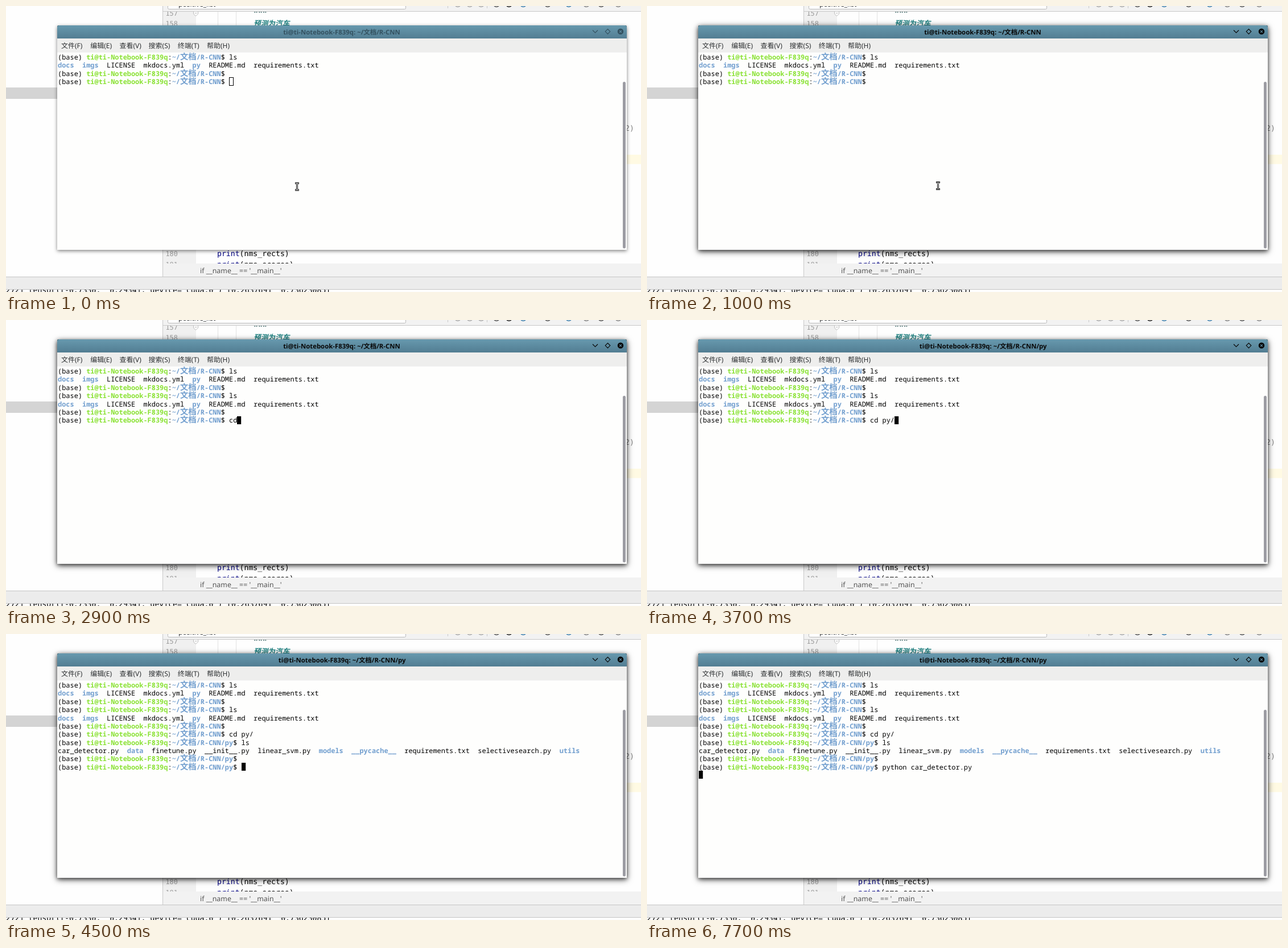
An HTML page that plays this animation: 1116x502 px, repeating every 8000 ms.

```html
<!DOCTYPE html>
<html lang="zh">
<head>
<meta charset="utf-8">
<style>
html, body { margin: 0; width: 100%; height: 100%; overflow: hidden; background: #fefefe; }
svg { display: block; width: 1116px; height: 502px; }
text { white-space: pre; text-rendering: geometricPrecision; }
.code { font: 13.17px "DejaVu Sans Mono", monospace; }
.num { font: 11.8px "DejaVu Sans Mono", monospace; fill: #9a9a9a; }
.ui { font: 12px "Noto Sans", "Noto Sans CJK SC", sans-serif; fill: #2c2f31; }
.term { font: 11.95px "Noto Sans Mono", "Noto Sans CJK SC", monospace; fill: #000; }
.bold { font-weight: 700; }
.han { font: 700 14.34px "Noto Sans CJK SC", sans-serif; }
.user { fill: #8ae234; }
.dir { fill: #729fcf; }
#title { font: 700 11.4px "Noto Sans", "Noto Sans CJK SC", sans-serif; text-anchor: middle; }
#shadowIdle { filter: drop-shadow(0 2px 3px rgba(0,0,0,.5)); }
#shadowActive { filter: drop-shadow(0 3px 6px rgba(0,0,0,.6)); }
</style>
</head>
<body>
<svg viewBox="0 0 1116 502">
  <defs>
    <linearGradient id="bar" x2="0" y2="1">
      <stop offset="0" stop-color="#6799ae"/><stop offset="1" stop-color="#527d92"/>
    </linearGradient>
    <clipPath id="editorClip"><path d="M276 10H1116V452H276Z"/></clipPath>
    <clipPath id="consoleClip"><path d="M0 498H1116V502H0Z"/></clipPath>
  </defs>

  <!-- editor behind the terminal -->
  <path fill="#fefefe" d="M0 0H1116V502H0Z"/>
  <path fill="#d4d4d4" d="M0 143H90V163H0Z"/>
  <path fill="#f2f2f2" d="M276 0H1116V9H276Z"/>
  <path fill="#f0f0f0" d="M276 10H334V452H276Z"/>
  <path fill="#fffae3" d="M1091 261H1116V277.500H1091Z"/>
  <path fill="none" stroke="#c9c9c9" d="M275.500 0V475M276 9.500H1116M672.500 0V3M776.500 0V4M845.500 0V4"/>
  <rect x="284.500" y="-14" width="418" height="19.500" rx="2" fill="#fff" stroke="#b8b8b8"/>
  <text class="ui" x="303" y="1">positive_list</text>
  <g id="tools" fill="none" stroke-width="1.500"></g>
  <g clip-path="url(#editorClip)">
    <path stroke="#e2e2e2" d="M372.500 10V34M404.500 10V34"/>
    <path fill="#fff" stroke="#bcbcbc" d="M329.500 9V14L333.500 17.500L337.500 14V9M331.500 12.500H335.500"/>
    <text class="num" x="280.500" y="17">157</text>
    <text class="num" x="280.500" y="35">158</text>
    <text class="num" x="280.500" y="439">180</text>
    <text class="num" x="280.500" y="457.500">181</text>
    <text class="code bold" x="435" y="18" fill="#5b7d7d" font-style="italic">"""</text>
    <text x="435" y="35" fill="#1f8080" style="font:italic 700 12.700px 'Noto Sans CJK SC',sans-serif">预测为汽车</text>
    <text class="code" x="371" y="439"><tspan fill="#000080">print</tspan>(nms_rects)</text>
    <text class="code" x="371" y="457.500"><tspan fill="#000080">print</tspan>(nms_scores)</text>
    <text class="code" x="1088" y="218.500" fill="#808080" font-style="italic">2)</text>
  </g>
  <path fill="#f2f2f2" d="M276 452H1116V475H276Z"/>
  <text class="ui" x="341" y="469" style="font-size:12.400px;fill:#555">if __name__ == '__main__'</text>
  <path fill="#ececec" d="M0 476H1116V497H0Z"/>
  <path stroke="#c6c6c6" d="M0 475.500H1116M0 497.500H1116"/>
  <g clip-path="url(#consoleClip)">
    <text class="code" x="0" y="502.500">272] tensor([-0.7330,  0.2934], device='cuda:0') [0.2637691  0.73623085]</text>
  </g>

  <!-- terminal window -->
  <path id="shadowIdle" d="M90 37Q90 34 93 34H1088Q1091 34 1091 37V428H90Z"/>
  <path id="shadowActive" d="M90 37Q90 34 93 34H1088Q1091 34 1091 37V428H90Z"/>
  <path fill="#fefefd" d="M90 57H1091V428H90Z"/>
  <path fill="url(#bar)" d="M90 57V37Q90 34 93 34H1088Q1091 34 1091 37V57Z"/>
  <path fill="#eeeeed" d="M90 57H1091V81.500H90Z"/>
  <rect x="1084" y="133" width="5" height="292.500" rx="2.500" fill="#9c9ca3"/>
  <text id="title" y="50"></text>
  <g id="buttons" fill="none" stroke-width="1.100">
    <path d="M1031 42.500L1035.500 47L1040 42.500M1057.500 40.500L1061.800 44.800L1057.500 49.100L1053.200 44.800Z"/>
    <circle id="close" cx="1080" cy="44.800" r="4.700"/>
    <path stroke="#5e8ca1" d="M1078 42.800L1082 46.800M1082 42.800L1078 46.800"/>
  </g>
  <g id="menu" class="ui"></g>
  <g id="screen" class="term"></g>
  <rect id="cursor" stroke="#000"/>
  <g id="pointer" fill="none">
    <path stroke="#111" stroke-width="3" d="M508 -6H510.500L511.500 -5L512.500 -6H515M511.500 -5V5M508 6H510.500L511.500 5L512.500 6H515"/>
    <path stroke="#fff" stroke-width="1" d="M508.800 -6H510.500L511.500 -5L512.500 -6H514.200M511.500 -5V5M508.800 6H510.500L511.500 5L512.500 6H514.200"/>
  </g>
</svg>
<script>
const LOOP = 8000, LEFT = 91, TOP = 82.6, CELL = 7.168, ROW = 14.35;
const USER = 'ti@ti-Notebook-F839q';
const $ = id => document.getElementById(id);

function add(parent, tag, attrs, content = '') {
  const el = document.createElementNS('http://www.w3.org/2000/svg', tag);
  for (const key in attrs) el.setAttribute(key, attrs[key]);
  el.textContent = content;
  return parent.appendChild(el);
}

['文件(F)', '编辑(E)', '查看(V)', '搜索(S)', '终端(T)', '帮助(H)'].forEach((label, i) =>
  add($('menu'), 'text', { x: 97 + 51.2 * i, y: 74.3 }, label));

[[790, '#aaa'], [811, '#aaa'], [831, '#aaa'], [858, '#555'], [880, '#222'], [905, '#3b7fae'],
 [948, '#555'], [985, '#3b7fae'], [1016, '#888'], [1042, '#555'], [1072, '#888']].forEach(([x, stroke]) =>
  add($('tools'), 'path', { d: `M${x} 0Q${x + 4} 3 ${x + 8} 0`, stroke }));

// Each row holds what is printed at once; typed input is added after it.
const rows = [];
function addRow(time) {
  const group = add($('screen'), 'g', {});
  const row = { time, group, y: TOP + ROW * rows.length + 11.5 };
  row.put = (col, str, cls = '') =>
    add(group, 'text', { x: LEFT + col * CELL, y: row.y, class: cls }, str);
  rows.push(row);
  return row;
}

function prompt(time, sub = '') {
  const row = addRow(time);
  row.put(0, '(base)');
  row.put(7, USER, 'user bold');
  row.put(27, ':');
  row.put(28, '~/', 'dir bold');
  row.put(30, '文档', 'dir han');
  row.put(34, '/R-CNN' + sub, 'dir bold');
  row.put(40 + sub.length, '$');
  row.inputCol = 42 + sub.length;
  row.input = row.put(row.inputCol, '');
}

// A trailing slash marks a folder.
function listing(time, names) {
  const row = addRow(time);
  let col = 0;
  for (const entry of names.split(' ')) {
    const name = entry.replace('/', '');
    row.put(col, name, name === entry ? '' : 'dir bold');
    col += name.length + 2;
  }
}

const rootFiles = 'docs/ imgs/ LICENSE mkdocs.yml py/ README.md requirements.txt';
prompt(0);
listing(0, rootFiles);
prompt(0);
prompt(0);
listing(2100, rootFiles);
prompt(2100);
prompt(2300);
prompt(4000, '/py');
listing(4300, 'car_detector.py data/ finetune.py __init__.py linear_svm.py models/ __pycache__/ requirements.txt selectivesearch.py utils/');
prompt(4300, '/py');
prompt(4500, '/py');
addRow(7700).inputCol = 0;

// time, row, input so far
const typing = [
  [0, 0, 'ls'], [0, 3, ''], [1700, 3, 'ls'], [2100, 5, ''], [2300, 6, ''],
  [2700, 6, 'c'], [2900, 6, 'cd'], [3300, 6, 'cd p'], [3400, 6, 'cd py'], [3700, 6, 'cd py/'],
  [4000, 7, ''], [4200, 7, 'ls'], [4300, 9, ''], [4500, 10, ''],
  [5300, 10, 'py'], [5400, 10, 'pyt'], [5500, 10, 'pyth'], [5700, 10, 'python'], [5900, 10, 'python '],
  [7000, 10, 'python c'], [7300, 10, 'python car_detector.py '], [7700, 11, '']
];
const blinks = [[1000, 1700], [6400, 6900]];

function setAttrs(el, attrs) {
  for (const key in attrs) el.setAttribute(key, attrs[key]);
}

function render(t) {
  for (const row of rows) {
    row.group.style.display = t >= row.time ? '' : 'none';
    if (row.input) row.input.textContent = '';
  }
  let row, col;
  for (const [time, index, str] of typing) {
    if (time > t) break;
    row = rows[index];
    col = row.inputCol + str.length;
    if (row.input) row.input.textContent = str;
  }

  const hollow = t < 300, inset = hollow ? 0.5 : 0;
  setAttrs($('cursor'), {
    x: Math.round(LEFT + col * CELL) + inset,
    y: Math.round(row.y - 11.5) + inset - (hollow ? 1 : 0),
    width: hollow ? 7 : 7.2,
    height: 14,
    fill: hollow ? 'none' : '#000',
    'stroke-width': hollow ? 1 : 0,
    visibility: blinks.some(([from, to]) => t >= from && t < to) ? 'hidden' : 'visible'
  });

  // The window takes focus in four steps.
  const focus = Math.min(1, Math.max(0, (Math.floor(t / 100) - 2) / 4));
  const ink = `rgb(${[52, 82, 97].map(c => Math.round(c + (8 - c) * focus))})`;
  $('shadowActive').style.opacity = focus;
  $('title').setAttribute('fill', ink);
  $('buttons').setAttribute('stroke', ink);
  $('close').setAttribute('fill', ink);
  const inPy = t >= 3700;
  $('title').setAttribute('x', inPy ? 590.7 : 590);
  $('title').textContent = USER + ': ~/文档/R-CNN' + (inPy ? '/py' : '');

  $('pointer').setAttribute('transform', `translate(0 ${t < 400 ? 317 : 315.5})`);
  $('pointer').style.display = t < 1700 ? '' : 'none';
}

const start = performance.now();
function tick() {
  render((performance.now() - start) % LOOP);
  requestAnimationFrame(tick);
}
tick();
</script>
</body>
</html>
```
